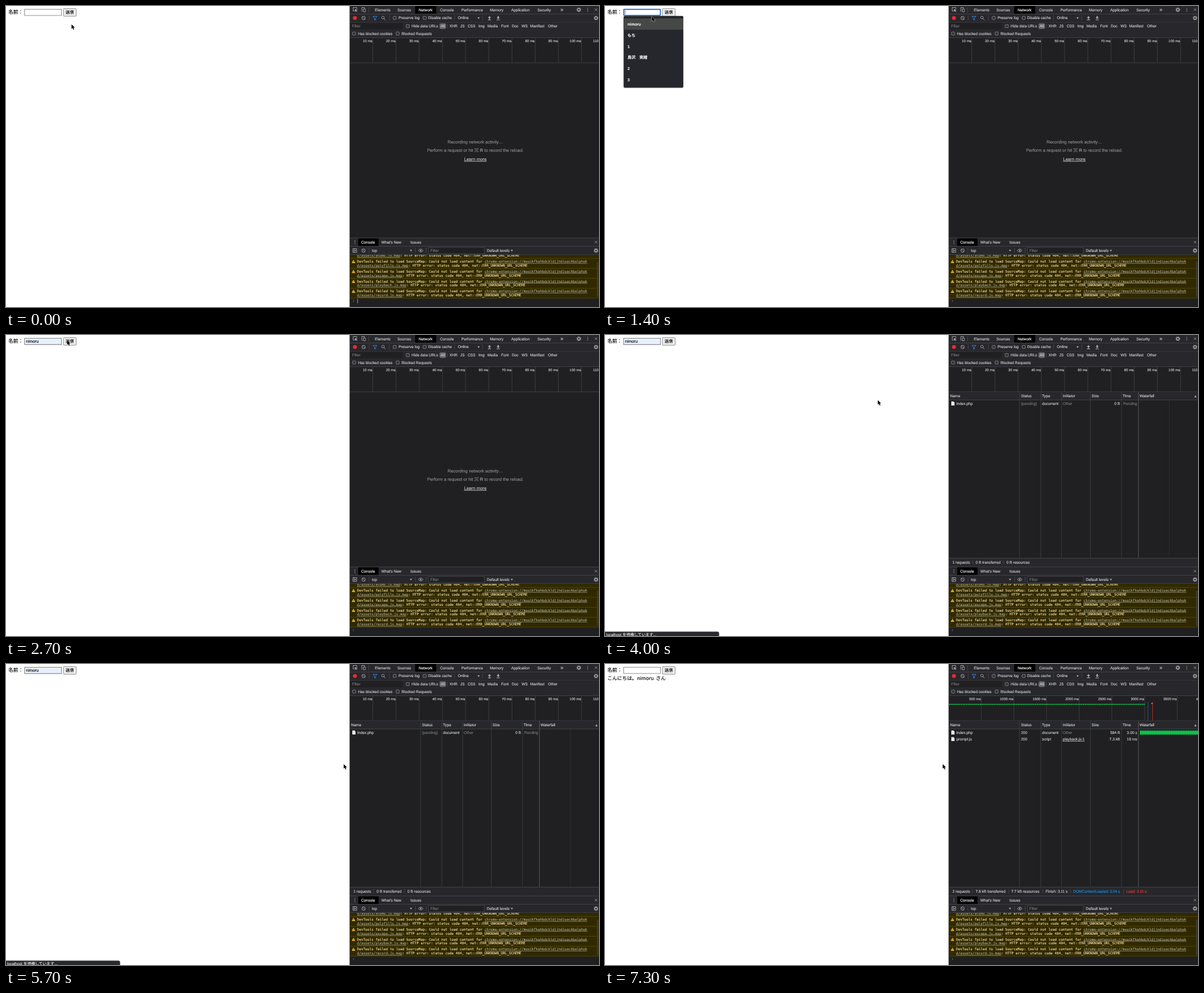
Write an HTML page that moves like this. It is 1000 px wide and 508 px high and loops after 7400 ms.

```html
<!DOCTYPE html>
<html lang="ja">
<head>
<meta charset="utf-8">
<title>Form request</title>
<style>
  html, body { margin: 0; width: 100%; height: 100%; overflow: hidden; background: #fff; }
  svg { display: block; width: 100vw; height: 100vh; }
  text { font: 6.35px "Liberation Sans", "Noto Sans CJK JP", "Noto Sans CJK", sans-serif; text-rendering: geometricPrecision; white-space: pre; stroke-width: 0.14px; }
  .mono { font: 5.76px "DejaVu Sans Mono", monospace; }
</style>
</head>
<body>
<svg id="stage" viewBox="0 0 1000 508" preserveAspectRatio="none"></svg>
<script>
const NS = 'http://www.w3.org/2000/svg';
const stage = document.getElementById('stage');
const LOOP = 7400;
const USER = 'nimoru';
const BAR = '#28282c', BODY = '#202022', EDGE = '#47484c', TEXT = '#cfd0d3', DIM = '#77787b', ICON = '#a4a6aa';
const CJK = '"Noto Sans CJK JP", "Noto Sans CJK", "Liberation Sans", sans-serif';

let parent = stage;

function add(tag, attrs, content) {
  const node = document.createElementNS(NS, tag);
  for (const key in attrs) node.setAttribute(key, attrs[key]);
  if (content !== undefined) node.textContent = content;
  parent.appendChild(node);
  return node;
}

function group(draw, attrs = {}) {
  const outer = parent;
  const node = parent = add('g', attrs);
  draw();
  parent = outer;
  return node;
}

const rect = (x, y, w, h, fill, more = {}) => add('rect', { x, y, width: w, height: h, fill, ...more });
const line = (d, stroke = ICON, width = 1, more = {}) => add('path', { d, stroke, 'stroke-width': width, fill: 'none', ...more });
const shape = (d, fill = ICON) => add('path', { d, fill });
const hline = (y, stroke = EDGE) => rect(580, y, 420, 0.8, stroke);
const vline = (x, y, h, stroke = EDGE) => rect(x, y, 0.8, h, stroke);

function text(x, y, str, fill = TEXT, style = '', anchor = 'start') {
  return add('text', { x, y, fill, stroke: fill, style, 'text-anchor': anchor }, str);
}

// Alternating x, label pairs on one baseline
function labels(y, pairs, fill = TEXT) {
  for (let i = 0; i < pairs.length; i += 2) text(pairs[i], y, pairs[i + 1], fill);
}

function box(x, y) {
  rect(x + 0.4, y + 0.4, 5.2, 5.2, '#303034', { stroke: '#8b8c90', 'stroke-width': 0.8, rx: 0.6 });
}

function gear(x, y) {
  add('circle', { cx: x, cy: y, r: 2.2, fill: 'none', stroke: ICON, 'stroke-width': 1.4 });
  add('circle', { cx: x, cy: y, r: 3.2, fill: 'none', stroke: ICON, 'stroke-width': 1.2, 'stroke-dasharray': '1.26 1.25' });
}

function block(x, y) {
  add('circle', { cx: x, cy: y, r: 2.9, fill: 'none', stroke: ICON, 'stroke-width': 0.9 });
  line(`M${x - 2} ${y - 2}l4 4`, ICON, 0.9);
}

function cross(x, y) { line(`M${x - 2} ${y - 2}l4 4m0-4l-4 4`, ICON, 0.8); }

function dots(x, y) {
  for (const d of [-2.4, 0, 2.4]) add('circle', { cx: x, cy: y + d, r: 0.7, fill: ICON });
}

function caretDown(x, y) { shape(`M${x - 2} ${y - 1.3}h4l-2 3z`); }

function form() {
  rect(0, 0, 580, 508, '#fff');
  text(4, 13.2, '名前：', '#000', `font: 8.3px ${CJK}`);
  rect(31.4, 5.4, 62.2, 10.6, '#fff', { stroke: '#767676', 'stroke-width': 0.8 });
  rect(96.9, 4.4, 21.4, 12.8, '#efefef', { stroke: '#767676', 'stroke-width': 0.8, rx: 0.8 });
  text(100.6, 13.1, '送信', '#000', `font: 6.95px ${CJK}`);
}

function filledInput() {
  rect(31.4, 5.4, 62.2, 10.6, '#e8f0fe', { stroke: '#767676', 'stroke-width': 0.8 });
  text(33.8, 13, USER, '#000', 'font-size: 6.95px');
}

function suggestions() {
  rect(31, 17, 101.4, 121.8, '#000', { opacity: 0.25, rx: 2 });
  rect(31.5, 16.8, 100.5, 121, '#26272c', { rx: 2 });
  rect(31.5, 21, 100.5, 19, '#464747');
  [USER, 'もち', '1', '鳥沢　実緒', '2', '3'].forEach((name, i) =>
    text(38, 33 + 18.8 * i, name, '#f2f2f2', `font: bold 6.7px "Liberation Sans", ${CJK}`));
}

function tabs() {
  rect(579.4, 0, 420.6, 508, BODY);
  rect(580, 0, 420, 53, BAR);
  rect(690, 0, 35.5, 13, '#000');
  line('M588.5 8.5h-3v-6h6v3', ICON, 0.9);
  shape('M588 5l5 2-2 .8 1.4 1.6-.8.7-1.4-1.6-.9 1.6z');
  line('M600 9.5v-7h4.6v2M602.6 5h3.4v4.8h-3.4z', ICON, 0.9);
  vline(611, 2, 9);
  labels(8.6, [622, 'Elements', 660, 'Sources', 732, 'Console', 768, 'Performance', 816, 'Memory', 852, 'Application', 896, 'Security']);
  text(696, 8.6, 'Network', '#fff');
  text(935, 8.8, '»', TEXT, 'font-size: 9px');
  gear(966, 6.3);
  dots(981, 6.3);
  cross(995, 6.3);
  hline(13);
}

function networkBars() {
  add('circle', { cx: 588.4, cy: 20.2, r: 3.3, fill: '#ea2b33' });
  block(603, 20.3);
  vline(612, 15.5, 9);
  line('M618.8 17.4h6.8l-2.6 3.2v3h-1.6v-3z', '#2f86e8', 0.9);
  add('circle', { cx: 635.7, cy: 19.6, r: 2.2, fill: 'none', stroke: ICON, 'stroke-width': 0.9 });
  line('M637.3 21.2l2.6 2.6', ICON, 1);
  vline(646, 15.5, 9);
  box(652.5, 17.2);
  box(703, 17.2);
  labels(22.4, [662, 'Preserve log', 712, 'Disable cache', 762, 'Online']);
  vline(756, 15.5, 9);
  caretDown(797, 20.2);
  vline(803.5, 15.5, 9);
  shape('M815.3 17l2.8 3h-1.8v2.4h-2v-2.4h-1.8zM812.6 23h5.4v.9h-5.4z');
  shape('M830 22.2l2.8-3h-1.8v-2.2h-2v2.2h-1.8zM827.3 23h5.4v.9h-5.4z');
  gear(995, 20.3);
  hline(27, '#37383b');

  rect(581, 28.5, 88, 11, BODY);
  text(583.5, 36.2, 'Filter', DIM);
  box(674.5, 31);
  rect(731, 29.2, 11, 9.6, '#66686c', { rx: 2.4 });
  labels(36.2, [684, 'Hide data URLs', 733, 'All', 748, 'XHR', 766, 'JS', 778.5, 'CSS', 796.5, 'Img', 812, 'Media',
    835, 'Font', 853, 'Doc', 869.5, 'WS', 884, 'Manifest', 914, 'Other']);
  vline(744, 30, 8);
  box(584, 43.5);
  box(657.5, 43.5);
  labels(49, [593.5, 'Has blocked cookies', 667, 'Blocked Requests']);
  hline(53);
  hline(95.5);
}

function timeline(first, step, unit) {
  for (let i = 0, x = first; x < 1030; x = first + step * ++i) {
    vline(x, 54, 41.5, '#424347');
    text(x - 0.4, 61, `${unit * (i + 1)} ms`, TEXT, 'font-size: 5.9px', 'end');
  }
}

function emptyHint() {
  const size = 'font-size: 7.4px';
  text(791.5, 231.6, 'Recording network activity…', '#8b8c8e', size, 'middle');
  const hint = text(791.5, 246, 'Perform a request or hit ', '#8b8c8e', size, 'middle');
  const key = add('tspan', { 'font-weight': 'bold' }, '⌘ R');
  hint.append(key, ' to record the reload.');
  text(791.5, 260.8, 'Learn more', '#c3c4c6', size + '; text-decoration: underline', 'middle');
}

function table() {
  rect(580, 96.3, 420, 13.2, BAR);
  for (const x of [698.6, 734.6, 769.6, 818, 870.6]) vline(x, 96.3, 280, '#404145');
  vline(899, 96.3, 280, '#606165');
  labels(105.2, [582, 'Name', 701.5, 'Status', 737, 'Type', 772, 'Initiator', 820.5, 'Size', 873, 'Time', 901.5, 'Waterfall']);
  shape('M993.7 105.2l2-3.6 2 3.6z');
  hline(109.3);
  rect(580, 376.5, 420, 15, BAR);
  hline(376.3);
}

function row(y, name, status, type, initiator, size, time, pending) {
  shape(`M584 ${y - 5.8}h3.8l1.6 1.6v5.1h-5.4z`, '#eee');
  text(592.5, y, name);
  text(701.5, y, status, pending ? DIM : TEXT);
  text(737, y, type);
  text(772, y, initiator, initiator === 'Other' ? DIM : TEXT, initiator === 'Other' ? '' : 'text-decoration: underline');
  text(868.6, y, size, TEXT, '', 'end');
  text(897.4, y, time, pending ? DIM : TEXT, '', 'end');
}

function pendingState() {
  vline(951, 110, 266.3, '#303034');
  row(118, 'index.php', '(pending)', 'document', 'Other', '0 B', 'Pending', true);
  labels(386, [586, '1 requests', 625, '0 B transferred', 677, '0 B resources']);
  for (const x of [619.6, 671.6]) vline(x, 380, 7);
}

function statusBubble() {
  shape('M0 500.6h189.5q3 0 3 3v4.4H0z', '#4b4c50');
  shape('M0 501.3h189.3q2.5 0 2.5 2.5v4.2H0z', '#28292c');
  text(2, 508.4, 'localhost を待機しています...', '#e4e4e4', 'font-size: 6.5px');
}

function greenDots(x, y, w, h) {
  line(`M${x} ${y + h / 2}h${w}`, '#10d657', h, { 'stroke-dasharray': '1.8 1.1' });
}

function doneState() {
  greenDots(580, 67.2, 331, 1.8);
  vline(915, 64, 31.5, '#1763ad');
  vline(923, 64, 31.5, '#c93028');
  rect(921, 66, 2.6, 1.2, '#d8a08e');
  row(118, 'index.php', '200', 'document', 'Other', '584 B', '3.00 s');
  row(129.2, 'prompt.js', '200', 'script', 'playback.js:1', '7.3 kB', '18 ms');
  greenDots(902, 112.2, 98, 7.2);
  rect(902, 113.3, 98, 5, '#0cc24c');
  labels(386, [586, '2 requests', 625, '7.8 kB transferred', 685, '7.7 kB resources', 743, 'Finish: 3.11 s']);
  text(789.5, 386, 'DOMContentLoaded: 3.04 s', '#1191e6');
  text(879, 386, 'Load: 3.11 s', '#ee3b36');
  for (const x of [619.6, 680, 737.6, 784, 874]) vline(x, 380, 7);
}

function greeting() {
  const style = `font: 8.3px ${CJK}`;
  text(4, 27, 'こんにちは。', '#000', style);
  text(54, 27, USER, '#000', style);
  text(85.8, 27, 'さん', '#000', style);
}

function consoleRows() {
  const id = 'd/assets/';
  const host = 'chrome-extension://mooikfkahbdckldjjndioackbalphok';
  add('clipPath', { id: 'log' }).innerHTML = '<rect x="580" y="420" width="420" height="88"/>';
  group(() => {
    rect(580, 420, 420, 72.8, '#302900');
    ['atoms', 'polyfills', 'escape', 'playback', 'record'].forEach((file, i) => {
      const y = 416.3 + 16.75 * i;
      rect(580, y + 9.3, 420, 0.8, '#5a4e00');
      shape(`M586 ${y - 4.8}l3 5.4h-6z`, '#f4bd26');
      rect(585.7, y - 2.9, 0.7, 2, '#332b00');
      const put = (x, dy, str, link) => {
        const node = text(x, y + dy, str, link ? '#a9a58f' : '#f6dda0', link ? 'text-decoration: underline' : '');
        node.setAttribute('class', 'mono');
      };
      const path = id + file + '.js.map';
      const step = 5.76 * 0.602;
      put(592, 0, 'DevTools failed to load SourceMap: Could not load content for ');
      put(592 + 62 * step, 0, host, true);
      put(592, 6.7, path, true);
      put(592 + path.length * step, 6.7, ': HTTP error: status code 404, net::ERR_UNKNOWN_URL_SCHEME');
    });
    rect(996.4, 431, 3, 60, '#3c3a2c', { rx: 1.5 });
    line('M584.9 496l2 1.9-2 1.9', '#6c7078', 0.8);
  }, { 'clip-path': 'url(#log)' });
}

function drawer() {
  rect(580, 391.5, 420, 28.5, BAR);
  rect(594, 392, 34.3, 13, '#000');
  hline(391);
  dots(588.3, 398.6);
  text(599, 400.8, 'Console', '#fff');
  labels(400.8, [633, 'What\'s New', 682, 'Issues']);
  cross(995, 398.5);
  hline(405);
  line('M585 409.5h6.4v6.4h-6.4zM587 409.5v6.4', ICON, 0.9);
  shape('M588.3 411l2.2 1.7-2.2 1.7z');
  block(603, 412.7);
  for (const x of [611.6, 690, 708]) vline(x, 408, 9);
  caretDown(683, 412.7);
  line('M695.4 412.7q4-5 8 0q-4 5-8 0z', ICON, 0.9);
  add('circle', { cx: 699.4, cy: 412.7, r: 1.3, fill: ICON });
  rect(712.4, 407.4, 94, 10.6, BODY, { stroke: EDGE, 'stroke-width': 0.8 });
  text(715.5, 414.9, 'Filter', DIM);
  labels(414.9, [617, 'top', 811, 'Default levels']);
  caretDown(853, 412.7);
  gear(995, 412.7);
  hline(419.4);
  consoleRows();
}

// Each scene part is visible from one time up to another
const parts = [];
const during = (from, to, draw) => parts.push({ from, to, node: group(draw) });

form();
during(1500, 6100, filledInput);
during(700, 2700, () => rect(31.6, 5.6, 61.8, 10.2, 'none', { stroke: '#1d63c9', 'stroke-width': 1.6, rx: 1 }));
during(700, 1500, () => rect(33.6, 7.4, 0.7, 6.8, '#333'));
during(6100, LOOP, greeting);
during(1200, 2300, suggestions);
tabs();
networkBars();
during(0, 6100, () => timeline(618.2, 39.1, 10));
during(6100, LOOP, () => timeline(634, 55.1, 500));
during(0, 3000, emptyHint);
during(3000, LOOP, table);
during(3000, 6100, pendingState);
during(6100, LOOP, doneState);
drawer();
during(0, 700, () => rect(592.6, 494.5, 0.7, 7, '#d5d6d8'));
during(3000, 6100, statusBubble);

const arrow = group(() => add('path', {
  d: 'M0 0v7.6l1.8-1.6 1.3 3 1.4-.6-1.3-2.9h2.4z',
  fill: '#000', stroke: '#fff', 'stroke-width': 0.8, 'paint-order': 'stroke'
}));
const beam = group(() => {
  const d = 'M-1.8-4q1.8 0 1.8 1v6q0 1-1.8 1M1.8-4q-1.8 0-1.8 1v6q0 1 1.8 1M-1 .8h2';
  line(d, '#fff', 1.4);
  line(d, '#222', 0.7);
});

// time, x, y of the pointer
const path = [
  [0, 110.5, 31], [600, 82, 15], [1300, 82, 15], [1700, 70, 27], [2300, 70, 27], [2600, 103, 9],
  [3400, 103, 9], [3800, 425, 98], [3900, 425, 98], [4000, 460, 110], [4400, 569.5, 169], [LOOP, 569.5, 169]
];

function pointerAt(t) {
  const i = path.findIndex(p => p[0] > t);
  const [t0, x0, y0] = path[i - 1], [t1, x1, y1] = path[i];
  const k = (t - t0) / (t1 - t0);
  return [x0 + (x1 - x0) * k, y0 + (y1 - y0) * k];
}

function render(now) {
  const t = Math.floor((now % LOOP) / 100) * 100;
  for (const { from, to, node } of parts) node.style.display = t >= from && t < to ? '' : 'none';
  const [x, y] = pointerAt(t);
  const overInput = t < 1600 && x < 94 && y < 17;
  for (const node of [arrow, beam]) node.setAttribute('transform', `translate(${x} ${y})`);
  arrow.style.display = overInput ? 'none' : '';
  beam.style.display = overInput ? '' : 'none';
}

const start = performance.now();
function tick() {
  render(performance.now() - start);
  requestAnimationFrame(tick);
}
tick();
</script>
</body>
</html>
```
